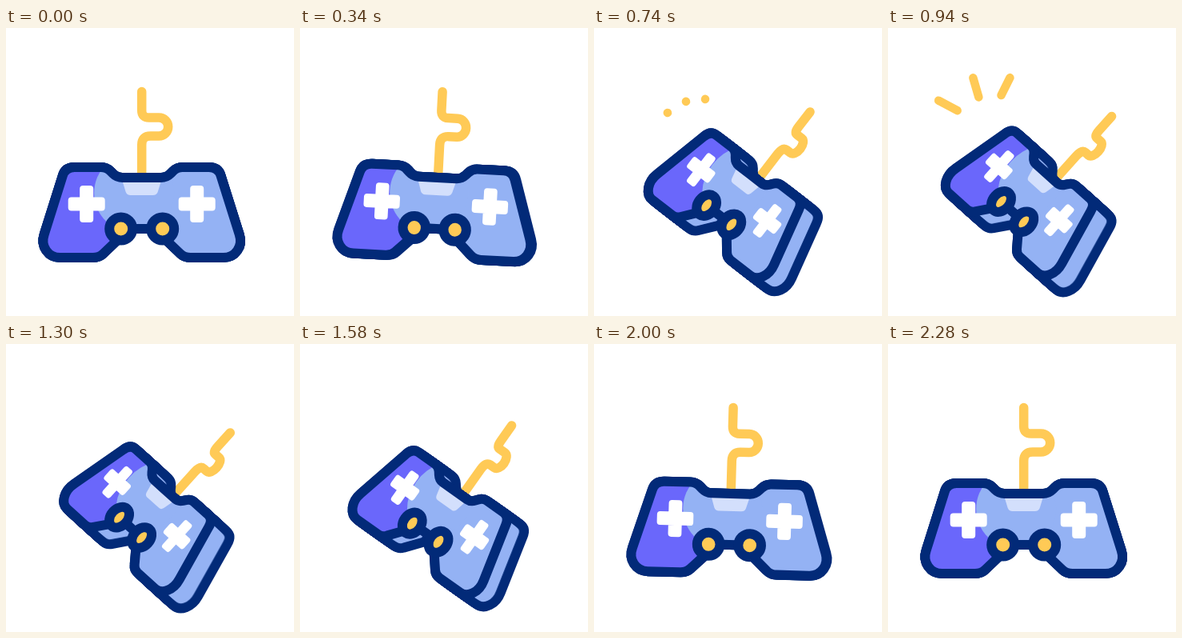
Write an HTML page with a canvas that moves like this. It is 360 px wide and 360 px high and loops after 2.4 s.

```html
<!DOCTYPE html>
<html lang="en">
<head>
<meta charset="utf-8">
<title>Game controller</title>
<style>
  html, body { margin: 0; width: 100%; height: 100%; overflow: hidden; background: #fff; }
  canvas { display: block; width: 360px; height: 360px; }
</style>
</head>
<body>
<canvas id="stage"></canvas>
<script>
const LOOP = 2400, SIZE = 360;
const NAVY = '#022a78', BLUE = '#94b2f4', PURPLE = '#6a67fb', PALE = '#d3dffc', YELLOW = '#ffca56';
const ratio = window.devicePixelRatio || 1;

function setup(canvas) {
  canvas.width = canvas.height = SIZE * ratio;
  const c = canvas.getContext('2d');
  c.lineJoin = c.lineCap = 'round';
  return c;
}
const ctx = setup(document.getElementById('stage'));
const coreCanvas = document.createElement('canvas');
const core = setup(coreCanvas);

// Shapes are centred on the point midway between the two crosses.
const body = new Path2D(
  'M0 -33H24Q31 -33 36 -38L39 -41Q44 -46 51 -46H84Q96 -46 99 -35L122 38' +
  'C127 53 117 67 102 67H61Q53 67 48 62L26 41V31H-26V41L-48 62Q-53 67 -61 67H-102' +
  'C-117 67 -127 53 -122 38L-99 -35Q-96 -46 -84 -46H-51Q-44 -46 -39 -41L-36 -38Q-31 -33 -24 -33Z');
const cable = new Path2D('M0 -140.5V-117Q0 -108 9 -108H21.5A11.5 11.5 0 0 1 21.5 -85H11Q0 -85 0 -74V-30');
const tab = new Path2D('M-24 -28H24L20 -15Q18.5 -11 14 -11H-14Q-18.5 -11 -20 -15Z');
const shadeEdge = new Path2D('M-140 -60H-10V80H-140Z');
const lightDisc = disc(-9.5, -14, 50);

function disc(x, y, r) {
  const p = new Path2D();
  p.arc(x, y, r, 0, Math.PI * 2);
  return p;
}
function cross(x) {
  const p = new Path2D();
  p.roundRect(x - 23, -8.5, 46, 17, 4);
  p.roundRect(x - 8.5, -23, 17, 46, 4);
  return p;
}
const crosses = [cross(-69), cross(69)];
const sticks = [disc(-26, 31, 14.5), disc(26, 31, 14.5)];

// Outer end last: x1, y1, x2, y2
const sparks = [[92, 106, 62, 90], [115, 92, 106, 61], [139, 89, 153, 61]];

const clamp = v => Math.min(1, Math.max(0, v));
const span = (t, from, to) => clamp((t - from) / (to - from));
const smooth = u => u * u * (3 - 2 * u);

// Symmetric cubic-bezier(.82, 0, .18, 1)
function ease(x) {
  const a = 0.82;
  let lo = 0, hi = 1;
  for (let i = 0; i < 24; i++) {
    const s = (lo + hi) / 2, q = 1 - s;
    if (3 * q * q * s * a + 3 * q * s * s * (1 - a) + s * s * s < x) lo = s; else hi = s;
  }
  return smooth(lo);
}

function turn(t) {
  return t < 1140 ? ease(span(t, 0, 1152)) : 1 - ease(span(t, 1128, 2262));
}
const tilt = p => 42.8 * p * Math.PI / 180;

// Squeezes and shifts a path while its stroke keeps full weight.
function fit(path, sx, dx = 0) {
  const p = new Path2D();
  p.addPath(path, new DOMMatrix([sx, 0, 0, 1, dx, 0]));
  return p;
}

function fill(path, color) {
  ctx.fillStyle = color;
  ctx.fill(path);
}
function stroke(path, color, width) {
  ctx.strokeStyle = color;
  ctx.lineWidth = width;
  ctx.stroke(path);
}

function place(c, p) {
  c.setTransform(ratio, 0, 0, ratio, 0, 0);
  c.translate(169.7 + 1.4 * p + 5.5 * p * p, 220 - 14 * p * p);
  c.rotate(tilt(p));
}

function drawSides(front, p) {
  const depth = 32 * Math.pow(p, 1.1), steps = Math.ceil(depth / 1.2);
  if (!steps) return;

  for (let i = 0; i <= steps; i++) {
    ctx.save();
    ctx.translate(depth * i / steps, 0);
    fill(front, NAVY);
    stroke(front, NAVY, 12);
    ctx.restore();
  }

  // Inner area of the face, swept along the depth
  core.setTransform(1, 0, 0, 1, 0, 0);
  core.clearRect(0, 0, coreCanvas.width, coreCanvas.height);
  place(core, p);
  core.fillStyle = BLUE;
  core.fill(front);
  core.globalCompositeOperation = 'destination-out';
  core.lineWidth = 12;
  core.stroke(front);
  core.globalCompositeOperation = 'source-over';

  ctx.save();
  ctx.setTransform(ratio, 0, 0, ratio, 0, 0);
  for (let i = 0; i <= steps; i++) {
    const d = depth * i / steps;
    ctx.drawImage(coreCanvas, d * Math.cos(tilt(p)), d * Math.sin(tilt(p)), SIZE, SIZE);
  }
  ctx.restore();
}

function drawFace(front, sx) {
  ctx.save();
  ctx.clip(front);
  fill(front, BLUE);
  fill(fit(shadeEdge, sx), PURPLE);
  fill(fit(lightDisc, sx), BLUE);
  ctx.restore();
  fill(fit(tab, sx), PALE);
  stroke(front, NAVY, 12);
  for (const c of crosses) fill(fit(c, sx), '#fff');
}

function drawSticks(sx, t) {
  sticks.forEach((shape, i) => {
    const ring = fit(shape, sx);
    fill(ring, YELLOW);
    const u = span(t, 535, 645);
    if (i === 1 && u > 0 && u < 1) {
      // Glint passing over the right stick
      ctx.save();
      ctx.clip(ring);
      const k = 1 - 2 * u;
      fill(fit(disc(26 + 18 * k, 31 - 12 * k, 9), sx), '#fff');
      ctx.restore();
    }
    stroke(ring, NAVY, 12);
  });
}

function drawSparks(t) {
  const head = smooth(span(t, 730, 970)), tail = smooth(span(t, 890, 1080));
  if (head <= 0 || tail >= 1) return;
  for (const [x1, y1, x2, y2] of sparks) {
    const line = new Path2D();
    line.moveTo(x1 + (x2 - x1) * tail, y1 + (y2 - y1) * tail);
    line.lineTo(x1 + (x2 - x1) * head, y1 + (y2 - y1) * head);
    stroke(line, YELLOW, 10.5);
  }
}

function draw(t) {
  const p = turn(t), sx = 1 - 0.276 * p, front = fit(body, sx);
  ctx.setTransform(ratio, 0, 0, ratio, 0, 0);
  ctx.fillStyle = '#fff';
  ctx.fillRect(0, 0, SIZE, SIZE);
  drawSparks(t);
  place(ctx, p);
  stroke(fit(cable, 1 - 0.5 * p, 13 * p), YELLOW, 11.5);
  drawSides(front, p);
  drawFace(front, sx);
  drawSticks(sx, t);
}

const start = performance.now();
function tick() {
  draw((performance.now() - start) % LOOP);
  requestAnimationFrame(tick);
}
tick();
</script>
</body>
</html>
```
